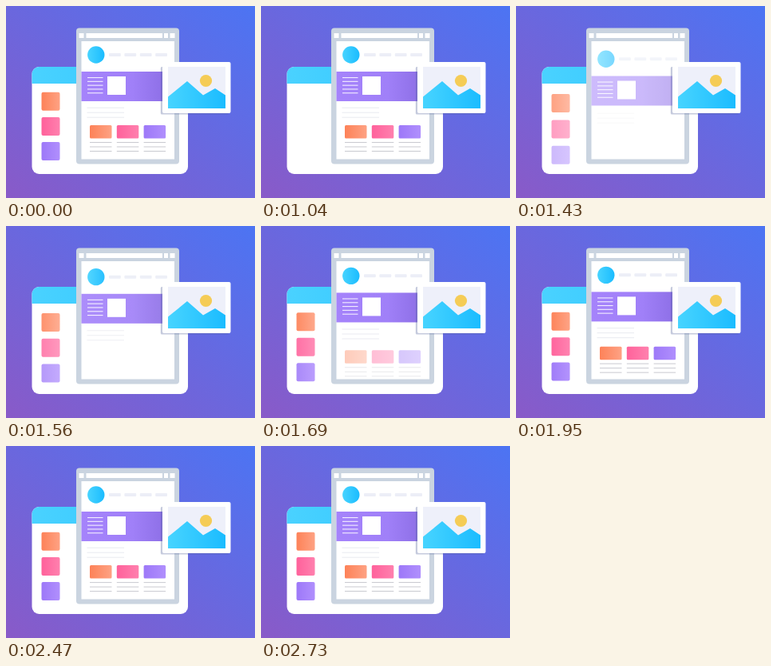
Animation of 312x240 px, one loop 3120 ms. Source, as an HTML page:

```html
<!DOCTYPE html>
<html lang="en">
<head>
<meta charset="utf-8">
<title>Page builder</title>
<style>
  html, body { margin: 0; width: 100%; height: 100%; overflow: hidden; }
  svg { display: block; width: 100%; height: 100%; }
</style>
</head>
<body>
<svg viewBox="0 0 312 240">
  <defs>
    <linearGradient id="sky" x1="0" y1="1" x2="1" y2="0">
      <stop offset="0" stop-color="#895ac8"/><stop offset="1" stop-color="#4c74f3"/>
    </linearGradient>
    <linearGradient id="cyan">
      <stop offset="0" stop-color="#47d4ff"/><stop offset="1" stop-color="#1bbcff"/>
    </linearGradient>
    <linearGradient id="bar" gradientUnits="userSpaceOnUse" x1="32" x2="228" y1="0" y2="0">
      <stop offset="0" stop-color="#4ad2ff"/><stop offset="1" stop-color="#2cc4ff"/>
    </linearGradient>
    <linearGradient id="band">
      <stop offset="0" stop-color="#a583fb"/><stop offset=".55" stop-color="#a080f8"/><stop offset=".9" stop-color="#8d6fe6"/>
    </linearGradient>
    <linearGradient id="orange">
      <stop offset="0" stop-color="#fd8258"/><stop offset="1" stop-color="#fea283"/>
    </linearGradient>
    <linearGradient id="pink">
      <stop offset="0" stop-color="#ff619b"/><stop offset="1" stop-color="#ff80ae"/>
    </linearGradient>
    <linearGradient id="violet">
      <stop offset="0" stop-color="#9d78f8"/><stop offset="1" stop-color="#b08ffd"/>
    </linearGradient>
    <clipPath id="panel"><rect x="32.5" y="76" width="195.5" height="134" rx="9"/></clipPath>
  </defs>

  <rect width="312" height="240" fill="url(#sky)"/>

  <g clip-path="url(#panel)">
    <rect x="32" y="76" width="197" height="134" fill="#fff"/>
    <rect x="32" y="76" width="197" height="21" fill="url(#bar)"/>
  </g>
  <g id="tiles"></g>

  <rect x="88" y="27.5" width="129" height="170" rx="4" fill="#cad4e0"/>
  <g fill="#fff">
    <rect x="91.5" y="34" width="6" height="6"/>
    <rect x="100.5" y="34" width="95.5" height="6"/>
    <rect x="198" y="34" width="5" height="6"/>
    <rect x="205.5" y="34" width="6" height="6"/>
    <rect x="94.5" y="44" width="116.5" height="147.5"/>
  </g>

  <g id="header">
    <circle cx="112.8" cy="61" r="10.7" fill="url(#cyan)"/>
  </g>
  <g id="hero">
    <rect x="94.5" y="82" width="116.5" height="37" fill="url(#band)"/>
    <rect x="127" y="88" width="23" height="23" fill="#fff"/>
  </g>
  <g id="copy"></g>
  <g id="cards"></g>

  <rect x="193.8" y="76" width="85" height="59.5" rx="1.5" fill="#56639c" opacity=".34"/>
  <rect x="196" y="70" width="85.5" height="64" rx="2" fill="#fff"/>
  <rect x="203" y="76" width="72" height="52" fill="#eef0fa"/>
  <circle cx="250.5" cy="93.5" r="7.6" fill="#f5cc56"/>
  <path d="M203 113.5L227 94L247 111.5L262 103L275 111.5V128H203Z" fill="url(#cyan)"/>
</svg>

<script>
const LOOP = 3120, STEP = 130, TAU = 193, RISE = 9.5;
const $ = id => document.getElementById(id);

function rect(parent, x, y, width, height, fill, rx = 0) {
  const el = document.createElementNS('http://www.w3.org/2000/svg', 'rect');
  const attrs = { x, y, width, height, fill, rx };
  for (const name in attrs) el.setAttribute(name, attrs[name]);
  parent.appendChild(el);
  return el;
}

const fills = ['orange', 'pink', 'violet'].map(name => `url(#${name})`);

const tiles = fills.map((fill, i) =>
  rect($('tiles'), 44.5, 107.7 + i * 31.2, 23, 23, fill, 2));

for (let i = 0; i < 4; i++) rect($('header'), 129 + i * 19.4, 59, 14.8, 4, '#eceef7', 1);
for (let i = 0; i < 5; i++) rect($('hero'), 102, 89 + i * 4.8, 19.5, 1.1, '#f3edff');
for (let i = 0; i < 3; i++) rect($('copy'), 101.5, 126.7 + i * 6, 46.5, 1, '#e9eaf0');
fills.forEach((fill, i) => {
  const x = 105 + i * 33.8;
  rect($('cards'), x, 149, 27.5, 16.5, fill, 1.5);
  for (let j = 0; j < 3; j++) rect($('cards'), x, 170 + j * 5.5, 27.5, 1, '#c9cad0');
});

// Each part disappears at `hide`, then rises and fades in from `start`.
const parts = [
  { el: tiles[0], hide: 1040, show: 1300, start: 1166, gain: 1 },
  { el: tiles[1], hide: 1040, show: 1300, start: 1244, gain: 1 },
  { el: tiles[2], hide: 1040, show: 1300, start: 1290, gain: 1 },
  { el: $('header'), hide: 1300, show: 1301, start: 1315, gain: 1.3 },
  { el: $('hero'), hide: 1300, show: 1301, start: 1325, gain: 1.3 },
  { el: $('copy'), hide: 1300, show: 1301, start: 1370, gain: 1.2 },
  { el: $('cards'), hide: 1300, show: 1561, start: 1610, gain: 1.2 }
];

function draw(time) {
  const t = Math.floor((time % LOOP) / STEP) * STEP;
  for (const { el, hide, show, start, gain } of parts) {
    let left = 0;
    if (t >= hide) left = t < show ? 1 : Math.min(1, Math.exp((start - t) / TAU));
    if (left < .004) left = 0;
    el.setAttribute('transform', `translate(0 ${(RISE * left).toFixed(2)})`);
    el.setAttribute('opacity', Math.min(1, gain * (1 - left)).toFixed(3));
  }
}

const begin = performance.now();
function tick() {
  draw(performance.now() - begin);
  requestAnimationFrame(tick);
}
tick();
</script>
</body>
</html>
```
